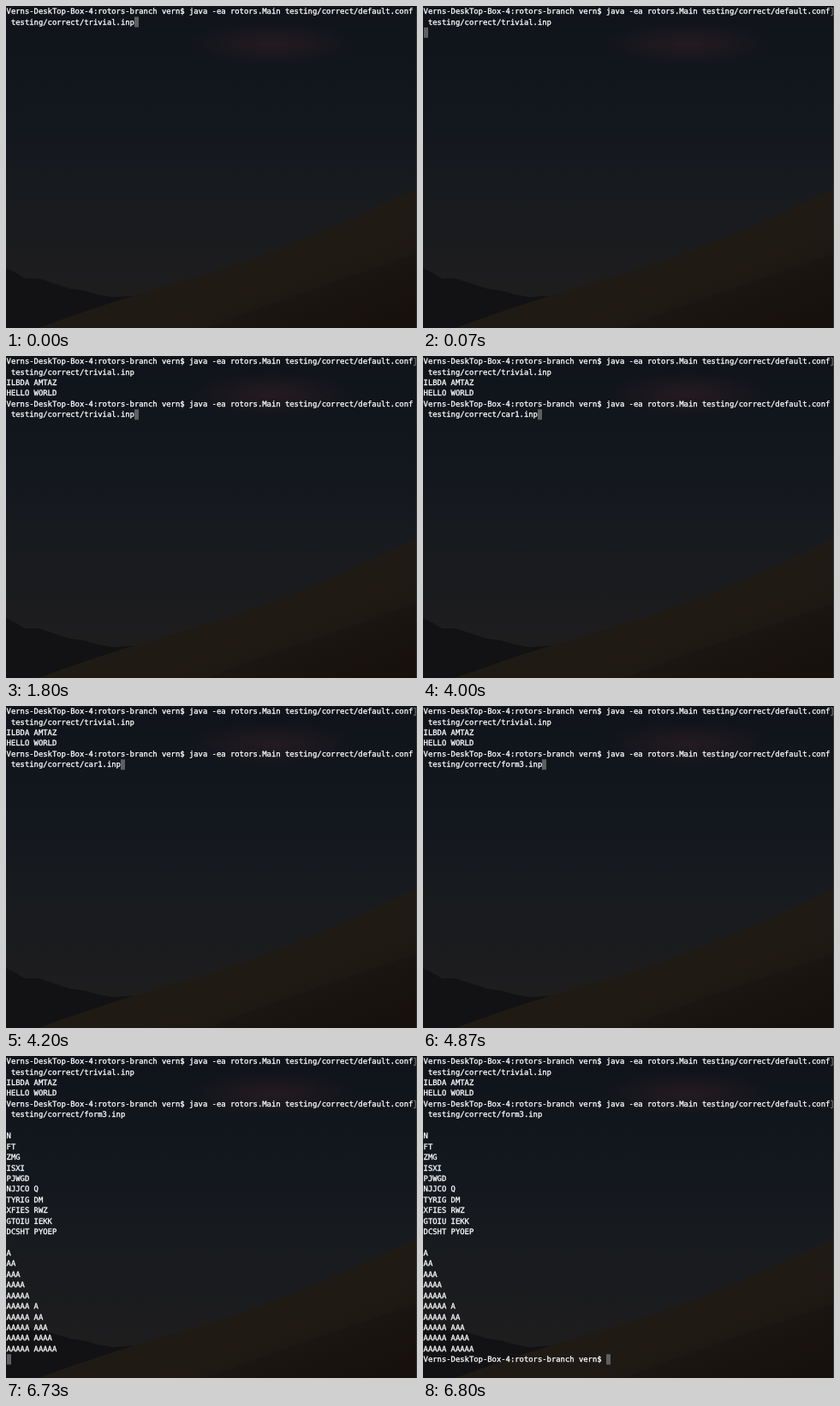
An HTML page that plays this animation: 480 by 376 pixels, repeating every 8 s.

```html
<!DOCTYPE html>
<html lang="en">
<head>
<meta charset="utf-8">
<title>Terminal session</title>
<style>
  html, body { margin: 0; width: 100%; height: 100%; overflow: hidden; background: #10141b; }
  svg { display: block; width: 100%; height: 100%; }
  text {
    font: 8.87px "DejaVu Sans Mono", monospace;
    fill: #fff; stroke: #fff; stroke-width: .3px;
    text-rendering: geometricPrecision;
  }
</style>
</head>
<body>
<svg viewBox="0 0 480 376">
  <defs>
    <linearGradient id="sky" x2="0" y2="1">
      <stop offset="0" stop-color="#10131a"/>
      <stop offset=".35" stop-color="#13171e"/>
      <stop offset=".65" stop-color="#191b1e"/>
      <stop offset=".9" stop-color="#1e1d1e"/>
    </linearGradient>
    <radialGradient id="cloud">
      <stop offset="0" stop-color="#2a1d22" stop-opacity=".75"/>
      <stop offset="1" stop-color="#2a1d22" stop-opacity="0"/>
    </radialGradient>
    <linearGradient id="sand" gradientUnits="userSpaceOnUse" x1="330" y1="280" x2="374" y2="390">
      <stop offset="0" stop-color="#1f1b14"/>
      <stop offset=".4" stop-color="#1e1912"/>
      <stop offset="1" stop-color="#19130f"/>
    </linearGradient>
    <linearGradient id="shade" gradientUnits="userSpaceOnUse" x1="390" y1="315" x2="415" y2="376">
      <stop offset="0" stop-color="#1b1611"/>
      <stop offset="1" stop-color="#17110e"/>
    </linearGradient>
  </defs>
  <rect width="480" height="376" fill="url(#sky)"/>
  <ellipse cx="310" cy="44" rx="100" ry="26" fill="url(#cloud)"/>
  <path fill="#121214" d="M0 306L12 312 22 318 38 318 50 322 62 326 75 330 90 332 108 337 125 340 152 338 110 376H0Z"/>
  <path fill="url(#sand)" d="M38 376Q95 355 150 338T250 308Q330 282 400 250T480 214V376Z"/>
  <path fill="url(#shade)" d="M235 376Q300 350 360 330T480 289V376Z"/>
  <path fill="#343434" d="M479 0h1v376h-1Z"/>
  <g id="screen"></g>
</svg>
<script>
const LOOP = 8000, COLS = 89, CHAR_W = 5.34, LINE_H = 12.43, LEFT = 0.6;
const PROMPT = "Verns-DeskTop-Box-4:rotors-branch vern$ ";
const screenEl = document.getElementById("screen");

const command = file =>
  `${PROMPT}java -ea rotors.Main testing/correct/default.conf testing/correct/${file}.inp`;
const wrap = line => [line.slice(0, COLS), line.slice(COLS)];
const group = word => word.replace(/(.{5})(?=.)/g, "$1 ");

const first = wrap(command("trivial"));
const greeting = [...first, "ILBDA AMTAZ", "HELLO WORLD"];
const last = [...greeting, ...wrap(command("form3"))];
const cipher = ["N", "FT", "ZMG", "ISXI", "PJWGD", "NJJCOQ", "TYRIGDM", "XFIESRWZ", "GTOIUIEKK", "DCSHTPYOEP"];
const plain = cipher.map((_, i) => "A".repeat(i + 1));
const output = [...last, "", ...cipher.map(group), "", ...plain.map(group)];

// Each state: start time, lines (cursor follows the last one), rows with an end mark
const states = [
  [0, first, []],
  [70, [...first, ""], [0]],
  [330, [...greeting, PROMPT], [0]],
  [1800, [...greeting, ...first], [0]],
  [4000, [...greeting, ...wrap(command("car1"))], [0]],
  [4870, last, [0]],
  [6530, [...last, ""], [0, 4]],
  [6730, [...output, ""], [0, 4]],
  [6800, [...output, PROMPT], [0, 4]]
];

function add(tag, attrs, content = "") {
  const el = document.createElementNS("http://www.w3.org/2000/svg", tag);
  for (const key in attrs) el.setAttribute(key, attrs[key]);
  el.textContent = content;
  screenEl.append(el);
}

function draw([, lines, marks]) {
  screenEl.replaceChildren();
  const row = lines.length - 1;
  add("rect", {
    x: Math.round(LEFT + lines[row].length * CHAR_W), y: row * LINE_H + 0.2,
    width: 5, height: 12.1, fill: "#5e5f61"
  });
  lines.forEach((line, i) => {
    const indent = line.length - line.trimStart().length;
    add("text", { x: LEFT + indent * CHAR_W, y: 9.2 + i * LINE_H }, line.trim());
  });
  for (const i of marks) {
    add("path", {
      d: `M476 ${i * LINE_H + 2.3}h2.2v8.6h-2.2`,
      fill: "none", stroke: "#929394", "stroke-width": 0.8
    });
  }
}

const origin = performance.now();
let shown;
function tick() {
  const t = (performance.now() - origin) % LOOP;
  const state = states.findLast(([start]) => start <= t);
  if (state !== shown) draw(shown = state);
  requestAnimationFrame(tick);
}
tick();
</script>
</body>
</html>
```
